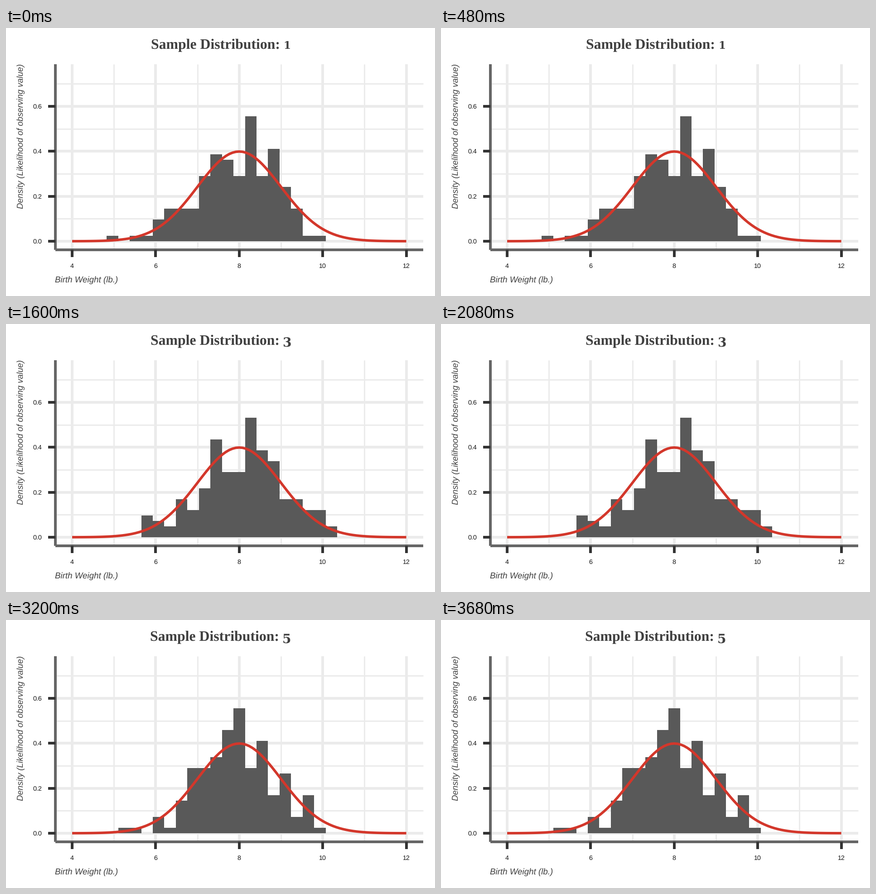
A matplotlib script that plays this animation: 947x592 px, repeating every 4 s.

```python
import numpy as np
import matplotlib.pyplot as plt
from matplotlib.animation import FuncAnimation

plt.rcParams.update({
    "toolbar": "None",
    "text.hinting": "no_hinting",
    "text.kerning_factor": 0,
})

W, H, DPI = 947, 592, 72  # 72 dpi: one point is one pixel
LEFT, RIGHT, TOP, BOTTOM = 109, 921, 80, 490
BINS = 29
SAMPLE_SIZE = 150
BIN_WIDTH = 8 / BINS

# first occupied bin and the counts from there on
SAMPLES = [
    (3, [1, 0, 1, 1, 4, 6, 6, 6, 12, 16, 15, 12, 23, 12, 17, 10, 6, 1, 1]),
    (3, [1, 0, 1, 2, 3, 2, 8, 11, 11, 11, 28, 19, 11, 14, 10, 3, 2, 5, 3,
         2, 1, 1, 1]),
    (6, [4, 3, 2, 7, 5, 9, 18, 12, 12, 22, 16, 14, 7, 7, 5, 5, 2]),
    (7, [3, 4, 12, 9, 9, 18, 21, 18, 18, 9, 9, 7, 5, 5, 1, 0, 2]),
    (4, [1, 1, 0, 3, 1, 6, 12, 12, 14, 19, 23, 12, 17, 7, 11, 3, 7, 1]),
]
TITLE_LEFT = [320.5, 318.5, 319.5, 317.5, 318.5]


def px(weight):
    return 146 + 92.2 * (weight - 4)


def py(density):
    return 471 - 496.7 * density


def line(x, y, color, width, z):
    ax.plot(x, y, color=color, lw=width, zorder=z, solid_capstyle="butt")


def label(x, y, text, size, color, family="Liberation Sans", **kw):
    kw = {"ha": "left", "va": "baseline", **kw}
    return ax.text(x, y, text, fontsize=size, color=color, family=family,
                   zorder=8, **kw)


def bar_tops(index):
    first, counts = SAMPLES[index]
    tops = np.zeros(BINS)
    tops[first:first + len(counts)] = counts
    return py(tops / (SAMPLE_SIZE * BIN_WIDTH))


fig = plt.figure(figsize=(W / DPI, H / DPI), dpi=DPI, facecolor="white")
ax = fig.add_axes([0, 0, 1, 1])
ax.set_xlim(0, W)
ax.set_ylim(H, 0)
ax.set_autoscale_on(False)
ax.axis("off")

# grid: thin lines below the thick ones
GRID = "#ebebeb"
for width, weights, densities in [
    (3, range(5, 12, 2), (0.1, 0.3, 0.5, 0.7)),
    (6, range(4, 13, 2), (0, 0.2, 0.4, 0.6)),
]:
    for d in densities:
        line([LEFT, RIGHT], [py(d)] * 2, GRID, width, 1)
    for w in weights:
        line([px(w)] * 2, [TOP, BOTTOM], GRID, width, 1)

edges = px(4 + BIN_WIDTH * np.arange(BINS + 1))
bars = ax.stairs(bar_tops(0), edges, baseline=py(0), fill=True,
                 color="#595959", lw=0, zorder=2)

weight = np.linspace(4, 12, 101)
normal = np.exp(-(weight - 8) ** 2 / 2) / np.sqrt(2 * np.pi)
line(px(weight), py(normal), "#d3372b", 5.6, 3)

# axes and ticks
line([LEFT, LEFT], [TOP, BOTTOM], "#666666", 6, 4)
line([LEFT, RIGHT], [BOTTOM, BOTTOM], "#666666", 6, 4)
for d in (0, 0.2, 0.4, 0.6):
    line([93, LEFT], [py(d)] * 2, "#333333", 6, 5)
    label(79.5, py(d) + 5, f"{d:.1f}", 14.2, "#111111", ha="right")
for w in range(4, 13, 2):
    line([px(w)] * 2, [BOTTOM, 506], "#333333", 6, 5)
    label(px(w), 530, str(w), 14.2, "#111111", ha="center")

label(108, 562, "Birth Weight (lb.)", 18.7, "#404040", style="italic")
label(38.5, 399, "Density (Likelihood of observing value)", 18.6, "#404040",
      style="italic", rotation=90, rotation_mode="anchor")

title = label(TITLE_LEFT[0], 46, "Sample Distribution:", 31.7, "#404040",
              "Liberation Serif", weight="bold")
number = label(619.8, 46, "1", 23, "#404040", "DejaVu Serif",
               weight="bold", ha="center")


def update(i):
    bars.set_data(values=bar_tops(i))
    title.set_x(TITLE_LEFT[i])
    # old-style figures: 1 and 2 stay small, the others descend
    low = i >= 2
    number.set_text(str(i + 1))
    number.set_fontsize(28 if low else 23)
    number.set_y(51 if low else 46)
    return bars, title, number


anim = FuncAnimation(fig, update, frames=len(SAMPLES), interval=800,
                     repeat=True, repeat_delay=0, blit=False)
plt.show()
```
